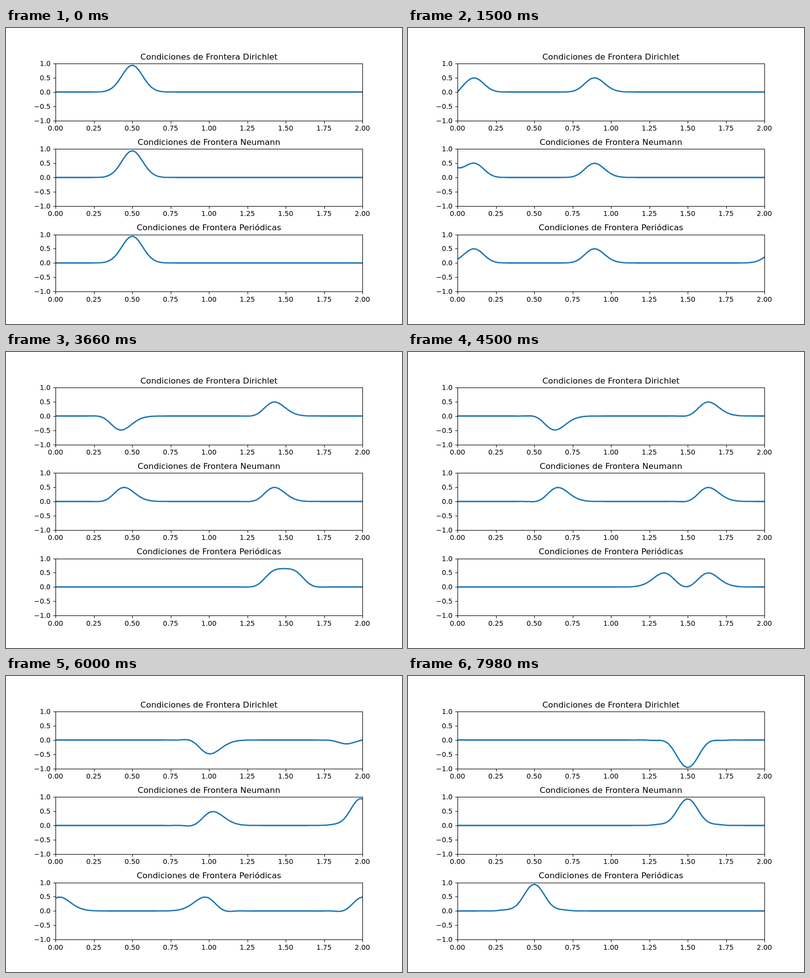
Animation, 800 px wide and 600 px high, one loop 8 s. Source, as an HTML page with a canvas:

```html
<!DOCTYPE html>
<html lang="es">
<head>
<meta charset="utf-8">
<style>
  html, body { margin: 0; height: 100%; overflow: hidden; background: #fff; }
  canvas { display: block; }
</style>
</head>
<body>
<canvas id="stage" width="800" height="600"></canvas>
<script>
const ctx = document.getElementById('stage').getContext('2d');
const POINTS = 100, FRAMES = 400, FRAME_MS = 20, WARMUP = 4;
const DX = 2 / (POINTS - 1), DT = 0.005, C2 = (DT / DX) ** 2;
const LEFT = 100, WIDTH = 620, HEIGHT = 115.5, FONT = '"DejaVu Sans", sans-serif';
const LAST = POINTS - 1;

const plots = [
  { name: 'Dirichlet', top: 72, bound: u => { u[0] = u[LAST] = 0; } },
  { name: 'Neumann', top: 245.25, bound: u => { u[0] = u[1]; u[LAST] = u[LAST - 1]; } },
  { name: 'Periódicas', top: 418.5, bound: u => { u[0] = u[LAST - 1]; u[LAST] = u[1]; } }
];

// Explicit finite differences for the wave equation, starting from a pulse at rest.
function simulate(bound) {
  let u = Array.from({ length: POINTS }, (_, i) => Math.exp(-125 * (i * DX - 0.5) ** 2));
  let prev = u;
  const states = [];
  for (let n = 1; n < FRAMES + WARMUP; n++) {
    const next = u.map((v, i) =>
      i && i < LAST ? 2 * v - prev[i] + C2 * (u[i + 1] - 2 * v + u[i - 1]) : 0);
    bound(next);
    prev = u;
    u = next;
    if (n >= WARMUP) states.push(u);
  }
  return states;
}

const snap = v => Math.floor(v + 0.5) + 0.5;

function segment(x1, y1, x2, y2) {
  ctx.beginPath();
  ctx.moveTo(x1, y1);
  ctx.lineTo(x2, y2);
  ctx.stroke();
}

function label(text, x, y, size, align) {
  ctx.font = size + 'px ' + FONT;
  ctx.textAlign = align;
  ctx.fillText(text, x, Math.round(y));
}

function drawCurve(u, top) {
  ctx.save();
  ctx.beginPath();
  ctx.rect(LEFT, top, WIDTH, HEIGHT);
  ctx.clip();
  ctx.strokeStyle = '#1f77b4';
  ctx.lineWidth = 2.78;
  ctx.lineJoin = 'round';
  ctx.lineCap = 'square';
  ctx.beginPath();
  u.forEach((v, i) => ctx.lineTo(LEFT + WIDTH * i / LAST, top + HEIGHT * (1 - v) / 2));
  ctx.stroke();
  ctx.restore();
}

function drawAxes(name, top) {
  const bottom = top + HEIGHT, y0 = snap(top), y1 = snap(bottom), x0 = snap(LEFT);
  ctx.strokeStyle = ctx.fillStyle = '#000';
  ctx.lineWidth = 1.11;
  ctx.strokeRect(x0, y0, WIDTH, y1 - y0);
  for (let i = 0; i <= 8; i++) {
    const x = LEFT + WIDTH * i / 8;
    segment(snap(x), y1, snap(x), y1 + 5);
    label((i / 4).toFixed(2), x, bottom + 20.7, 13.89, 'center');
  }
  for (let i = 0; i <= 4; i++) {
    const y = top + HEIGHT * i / 4;
    segment(x0 - 5, snap(y), x0, snap(y));
    label((1 - i / 2).toFixed(1).replace('-', '\u2212'), 90.2, y + 5, 13.89, 'right');
  }
  label('Condiciones de Frontera ' + name, 410, top - 8.33, 16.67, 'center');
}

for (const p of plots) p.states = simulate(p.bound);

const start = performance.now();
function draw() {
  const time = Math.max(0, performance.now() - start);
  const frame = Math.floor(time / FRAME_MS) % FRAMES;
  ctx.fillStyle = '#fff';
  ctx.fillRect(0, 0, 800, 600);
  for (const p of plots) {
    drawCurve(p.states[frame], p.top);
    drawAxes(p.name, p.top);
  }
  requestAnimationFrame(draw);
}
draw();
</script>
</body>
</html>
```
